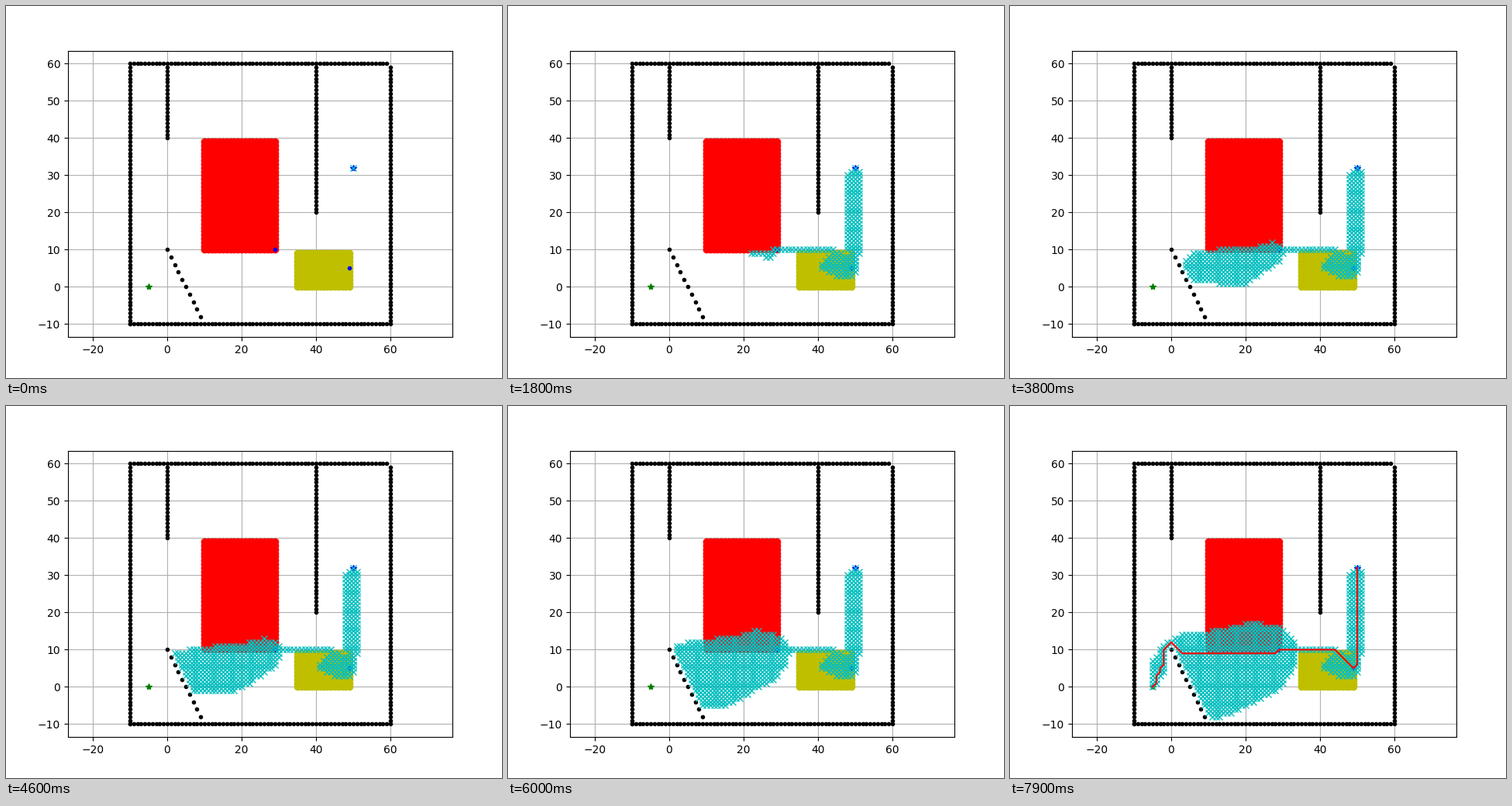
A matplotlib script that plays this animation: 640x480 px, repeating every 8 s.

```python
from itertools import product
from math import hypot

import matplotlib.pyplot as plt
from matplotlib.animation import FuncAnimation

FRAMES, INTERVAL = 80, 100
START, VIA_A, VIA_B, GOAL = (50, 32), (49, 5), (29, 10), (-5, 0)

STRAIGHT = [(1, 0), (0, 1), (-1, 0), (0, -1)]
MOVES = STRAIGHT + list(product((-1, 1), repeat=2))


def block(xs, ys):
    return list(product(xs, ys))


side = range(-10, 60)
walls = (block(side, [-10, 60]) + block([-10, 60], side)
         + block([0], range(40, 60)) + block([40], range(20, 60))
         + [(i, 10 - 2 * i) for i in range(10)])
red_zone = block(range(10, 30), range(10, 40))
yellow_zone = block(range(35, 50), range(10))

extra = {**dict.fromkeys(red_zone, 0.2), **dict.fromkeys(yellow_zone, 0.4)}
blocked = set(walls) | {(x + dx, y + dy) for x, y in walls for dx, dy in STRAIGHT}


def search(start, goal):
    """A* on the unit grid; returns the visited cells in order and the path."""
    def score(cell):
        return queue[cell] + hypot(goal[0] - cell[0], goal[1] - cell[1])

    queue, done, parent = {start: 0.0}, {}, {}
    while goal not in done:
        cell = min(queue, key=score)
        done[cell] = cost = queue.pop(cell)
        for dx, dy in MOVES:
            new = cell[0] + dx, cell[1] + dy
            if new in blocked or new in done:
                continue
            step = hypot(dx, dy)
            total = cost + step
            total += extra.get(new, 0) * step
            if new not in queue or queue[new] > total:
                queue[new], parent[new] = total, cell

    path = [goal]
    while path[-1] != start:
        path.append(parent[path[-1]])
    return list(done), path[::-1]


# One picture for every tenth visited cell of each leg
visited, counts, path = [], [], []
for leg in [(START, VIA_A), (VIA_A, VIA_B), (VIA_B, GOAL)]:
    cells, part = search(*leg)
    counts += [len(visited) + k + 1 for k in range(0, len(cells), 10)]
    visited += cells
    path += part

fig, ax = plt.subplots(figsize=(6.4, 4.8), dpi=100)


def draw(points, style):
    return ax.plot(*zip(*points), style)[0]


draw(walls, ".k")
draw([START], "*b")
draw([GOAL], "*g")
draw(yellow_zone, "oy")
draw(red_zone, "or")
draw([VIA_A, VIA_B], ".b")
marks = draw(visited, "xc")
route = draw(path, "-r")
ax.grid(True)
ax.axis("equal")


def update(i):
    last = i == FRAMES - 1
    n = len(visited) if last else counts[min(i, len(counts) - 1)]
    marks.set_data(*zip(*visited[:n]))
    route.set_visible(last)
    return marks, route


anim = FuncAnimation(fig, update, frames=FRAMES, interval=INTERVAL,
                     repeat=True, repeat_delay=0)
plt.show()
```
